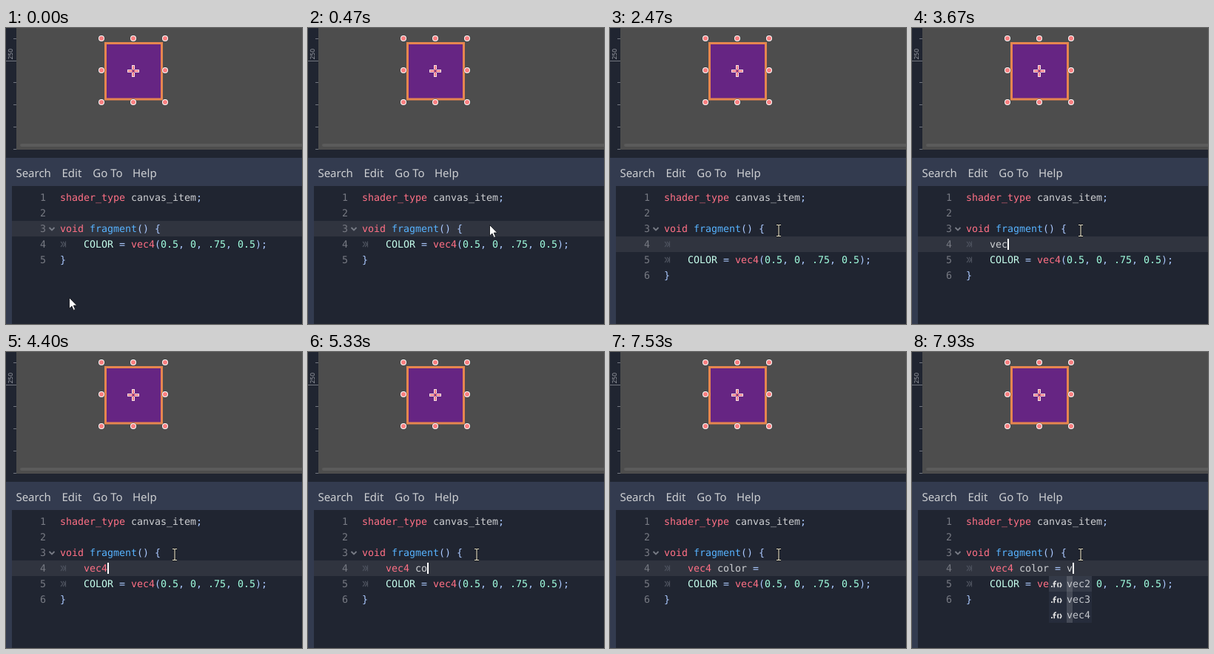
An HTML page that plays this animation: 400 by 399 pixels, repeating every 8 s.

```html
<!DOCTYPE html>
<html lang="en">
<head>
<meta charset="utf-8">
<title>Shader typing</title>
<style>
html, body { margin: 0; width: 100%; height: 100%; overflow: hidden; background: #202531; }
svg { display: block; }
text { white-space: pre; text-rendering: geometricPrecision; }
.code { font: 13.29px "DejaVu Sans Mono", monospace; }
.menu { font: 15px "Noto Sans", sans-serif; fill: #cdcfd2; }
</style>
</head>
<body>
<svg width="400" height="399" viewBox="0 0 400 399">
  <rect width="400" height="399" fill="#202531"/>
  <rect x="14" width="386" height="164" fill="#4d4d4d"/>
  <rect x="19" y="156" width="390" height="4" rx="2" fill="#5b5b5b"/>
  <g id="ruler" fill="#737780"></g>
  <text transform="translate(9 42.5) rotate(-90)" font-family="Noto Sans, sans-serif" font-size="8.5" fill="#9b9ea6">250</text>

  <rect x="134.5" y="20.5" width="76" height="75.5" fill="#662583" stroke="#e6864f" stroke-width="3"/>
  <path d="M164 58H170M174 58H180M172 50V56M172 60V66" stroke="#f4dfe2" stroke-width="4"/>
  <path d="M165 58H171M173 58H179M172 51V57M172 59V65" stroke="#f58088" stroke-width="2"/>
  <g id="handles"></g>

  <path d="M0 175H400V213H8V399H0Z" fill="#333b4f"/>
  <g class="menu">
    <text x="13.4" y="201">Search</text>
    <text x="75.5" y="201">Edit</text>
    <text x="117.3" y="201">Go To</text>
    <text x="171" y="201">Help</text>
  </g>
  <g id="editor" class="code"></g>
  <path id="arrow" d="M.5 .5V15.2L3.9 12L6.2 17.4L8.6 16.4L6.3 11.1H10.8Z" fill="#fff" stroke="#15171d" stroke-width=".9"/>
  <g id="beam" fill="none">
    <path d="M-3 .5H-1Q0 .5 0 1.5Q0 .5 1 .5H3M0 1.5V14.5M-3 15.5H-1Q0 15.5 0 14.5Q0 15.5 1 15.5H3" stroke="#111" stroke-width="2.6"/>
    <path d="M-3 .5H-1Q0 .5 0 1.5Q0 .5 1 .5H3M0 1.5V14.5M-3 15.5H-1Q0 15.5 0 14.5Q0 15.5 1 15.5H3" stroke="#e9e4cf" stroke-width="1.1"/>
  </g>
</svg>
<script>
const LOOP = 8000, CHAR = 8, ROW = 21, LEFT = 73, TOP = 218;
const TYPED = "vec4 color = v";
const KEYS = [3400, 3600, 3670, 4400, 4870, 5130, 5330, 5530, 5670, 5800, 6330, 6530, 6670, 7670];
const CLICK = 930, ENTER = 1930;
const CARET_OFF = [[0, CLICK], [1470, ENTER], [2470, 2930], [4200, 4400], [7530, 7670]];
const POPUPS = [[4000, 4400], [7930, LOOP]];

const $ = id => document.getElementById(id);
const within = (t, spans) => spans.some(([a, b]) => t >= a && t < b);
const rect = (x, y, w, h, fill) => `<rect x="${x}" y="${y}" width="${w}" height="${h}" fill="${fill}"/>`;
const text = (x, row, str, fill) => `<text x="${x}" y="${rowY(row) + 15}" fill="${fill}">${str}</text>`;
const rowY = row => TOP + row * ROW;

function tokenColor(word) {
  if (/^(shader_type|void|vec4)$/.test(word)) return "#ff7085";
  if (word === "fragment") return "#57b3ff";
  if (word === "COLOR") return "#c6ffed";
  if (/^[\d.]/.test(word)) return "#a1ffe0";
  return /^\w/.test(word) ? "#cdcfd2" : "#abc9ff";
}

function codeLine(line, row) {
  let out = text(46, row, row + 1, "#777a83");
  const y = rowY(row) + 10;
  let x = LEFT;
  if (line[0] === "\t") {
    out += `<path d="M74 ${y - 3}l3 3.5l-3 3.5M77 ${y - 3}l3 3.5l-3 3.5M80.5 ${y - 3.5}v8" fill="none" stroke="#4b505c" stroke-width="1.2"/>`;
    line = line.slice(1);
    x += 4 * CHAR;
  }
  for (const m of line.matchAll(/[A-Za-z_]\w*|[\d.]+|[^\s\w.]+/g))
    out += text(x + m.index * CHAR, row, m[0], tokenColor(m[0]));
  return out;
}

function popup(col, prefix) {
  const x = LEFT + col * CHAR, y = rowY(4);
  let out = rect(x - 24, y, 58, 3 * ROW, "#262c3b")
    + rect(x - 24, y, 58, ROW, "#fff2".replace("2", "1"))
    + rect(x, y, prefix * CHAR, 3 * ROW, "rgba(255,255,255,.14)");
  for (let i = 0; i < 3; i++) {
    const cy = y + i * ROW + 11;
    out += `<g transform="translate(${x - 24} ${cy})" fill="none" stroke="#e0e0e0" stroke-width="1.7">`
      + `<path d="M3 3.2h2M7.2 4.2V-1.8Q7.2 -4 10 -4M5.5 -.6h4"/>`
      + `<path d="M12.8 -2.2Q11 1 12.8 4M14.8 -2.2Q18.6 1 14.8 4"/></g>`
      + text(x, 4 + i, "vec" + (i + 2), "#c3c6cc");
  }
  return out;
}

function editor(t) {
  const entered = t >= ENTER;
  const count = KEYS.filter(k => t >= k).length;
  const lines = ["shader_type canvas_item;", "", "void fragment() {", "\tCOLOR = vec4(0.5, 0, .75, 0.5);", "}"];
  if (entered) lines.splice(3, 0, "\t" + TYPED.slice(0, count));
  const row = entered ? 3 : 2;
  const col = entered ? 4 + count : 17;
  let out = rect(8, rowY(row), 392, ROW, "#30343f") + lines.map(codeLine).join("");
  out += `<path d="M58.5 ${rowY(2) + 9}l3.5 3.5l3.5 -3.5" fill="none" stroke="#777b85" stroke-width="1.8"/>`;
  if (!within(t, CARET_OFF)) out += rect(LEFT + col * CHAR, rowY(row) + 3, 2, 15, "#fff");
  if (within(t, POPUPS)) {
    const prefix = count > 3 ? 1 : 3;
    out += popup(col - prefix, prefix);
  }
  return out;
}

function pointer(t) {
  const clicked = t >= CLICK;
  $("arrow").style.display = clicked ? "none" : "";
  $("beam").style.display = clicked ? "" : "none";
  // the pointer advances in 15 Hz steps
  const k = Math.min(1, Math.floor((t + 4) * 15 / 1000) / 7);
  const e = k * k * (3 - 2 * k);
  $("arrow").setAttribute("transform", `translate(${85 + 160 * e} ${363 - 98 * e})`);
  const [x, y] = t < 1130 ? [246.5, 258] : t < 1200 ? [234.5, 263] : [228, 265];
  $("beam").setAttribute("transform", `translate(${x} ${y})`);
}

for (let i = 0; i < 6; i++)
  $("ruler").innerHTML += rect(i === 1 ? 0 : 10, Math.round(14 + i * 29.7), i === 1 ? 14 : 4, 1, "#737780");
for (const x of [129, 172, 215])
  for (const y of [14, 57, 100])
    if (x !== 172 || y !== 57)
      $("handles").innerHTML += `<g transform="translate(${x} ${y})"><circle r="4.7" fill="#3a3a3a" opacity=".55"/><circle r="4" fill="#fff"/><circle r="3" fill="#f97f80"/></g>`;

let last = "";
function draw() {
  const t = performance.now() % LOOP;
  const html = editor(t);
  if (html !== last) $("editor").innerHTML = last = html;
  pointer(t);
  requestAnimationFrame(draw);
}
draw();
</script>
</body>
</html>
```
